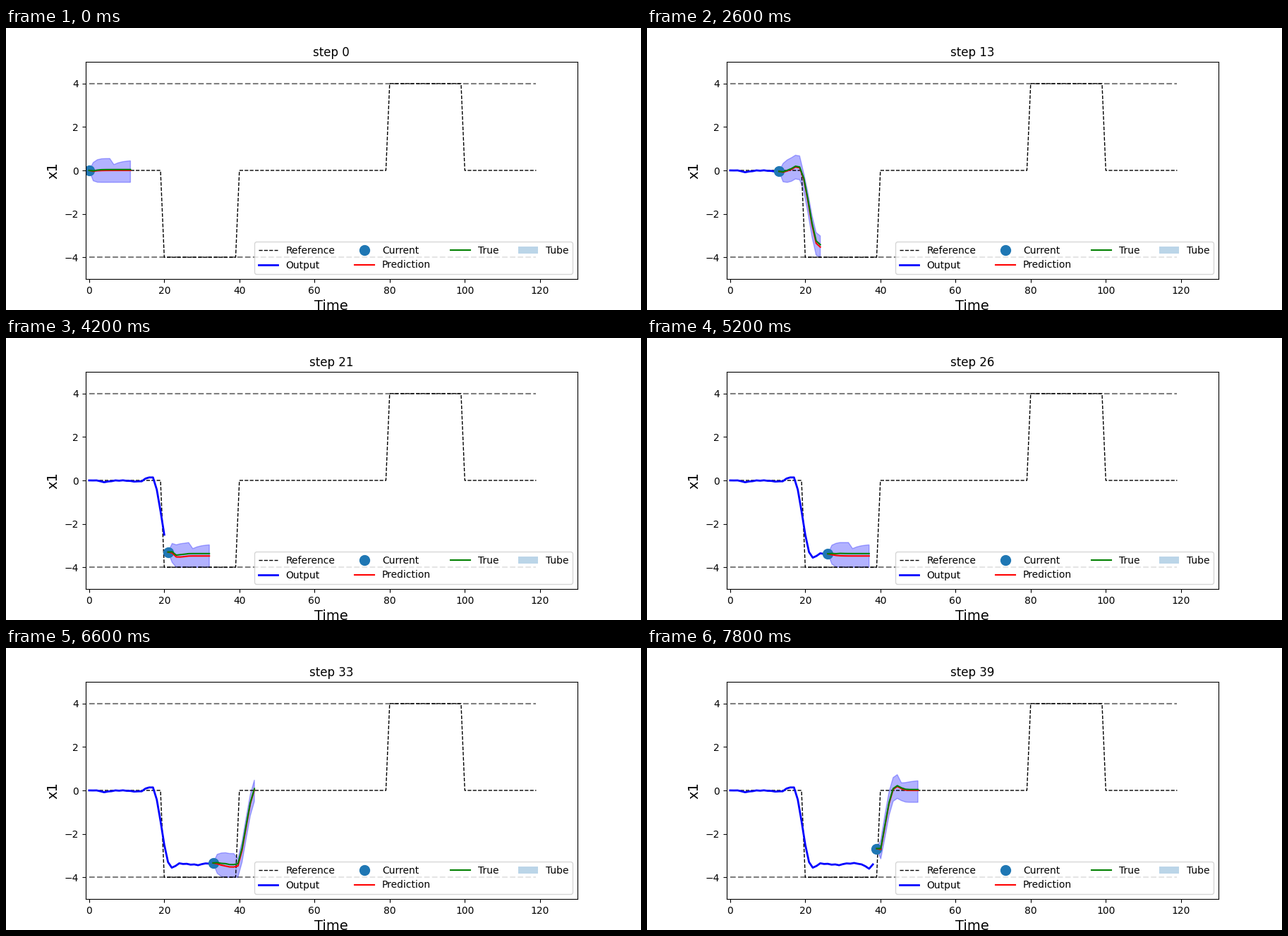
Animation, 900 px wide and 400 px high, one loop 8 s. Source, as a matplotlib script:

```python
import numpy as np
import matplotlib.pyplot as plt
from matplotlib.animation import FuncAnimation
from matplotlib.patches import Patch, Polygon

STEPS = 40
HORIZON = 11
LIMIT = 4
FALL, RISE = 19.3, 39.95    # times at the middle of each move
FLOOR = -3.53               # lowest planned value

J = np.arange(HORIZON)
AHEAD = np.maximum(J - 1, 0)    # the first point is held for one step
DECAY = .4 ** AHEAD

# Tube half widths along the horizon; the upper one restarts at J = 6.
UPPER = np.where(J < 6, .51 * (1 - np.exp(-1.4 * J)), .43 - .2 * np.exp((6 - J) / 2))
LOWER = .55 * (1 - np.exp(-1.6 * J))


def surge(u):
    """Step from 0 to 1 that swings past both ends."""
    return .5 + .5 * np.tanh(.66 * u) + .025 * u ** 3 * np.exp(-u ** 2 / 4)


def seen(k, centre):
    """How far a coming move is taken into account at step k."""
    return np.clip((k - centre + 12.3) / 3, 0, 1)


def measure():
    """State at every step: both moves with a slow sway and some noise."""
    t = np.arange(STEPS)
    noise = np.random.default_rng(4).normal(0, .015, STEPS)
    sway = .035 * np.cos(.78 * t) - .025
    return 3.36 * (surge(t - RISE) - surge(t - FALL)) + sway + noise


def predict(k):
    """Prediction, true path and tube bounds at step k."""
    t = k + AHEAD
    move = seen(k, RISE) * surge(t - RISE) - seen(k, FALL) * surge(t - FALL)
    plan = np.maximum(3.48 * move, FLOOR)
    pred = plan + (output[k] - .04 - plan[0]) * DECAY
    true = pred + (.04 - .02 * pred) * np.minimum(1, .5 + .25 * AHEAD)
    high = np.minimum(true + UPPER, LIMIT)
    low = np.maximum(pred - LOWER, -LIMIT)
    for path in (pred, true, high, low):
        path[0] = output[k]
    return pred, true, high, low


output = measure()

fig, ax = plt.subplots(figsize=(9, 4), dpi=100)
ax.set_xlim(-1, 130)
ax.set_ylim(-5, 5)
ax.set_xlabel("Time", fontsize=14)
ax.set_ylabel("x1", fontsize=14)
title = ax.set_title("step 0")

time = np.arange(120)
reference = np.zeros(120)
reference[20:40] = -LIMIT
reference[80:100] = LIMIT

for bound in (LIMIT, -LIMIT):
    ax.plot(time, np.full(120, bound), "k--", alpha=.5)
ref_line, = ax.plot(time, reference, "k--", lw=1, label="Reference")
out_line, = ax.plot([], [], "b", lw=2, label="Output")
dot, = ax.plot([], [], "o", color="C0", ms=10, label="Current")
pred_line, = ax.plot([], [], "r", label="Prediction")
true_line, = ax.plot([], [], "g", label="True")
tube = ax.add_patch(Polygon(np.zeros((3, 2)), color="blue", alpha=.3, lw=1, zorder=1))

tube_key = Patch(facecolor="C0", alpha=.3, lw=0, label="Tube")
ax.legend(handles=[ref_line, out_line, dot, pred_line, true_line, tube_key],
          loc="lower right", ncol=4)


def draw(k):
    x = np.linspace(k, k + HORIZON, HORIZON)
    pred, true, high, low = predict(k)
    title.set_text(f"step {k}")
    out_line.set_data(np.arange(k), output[:k])
    dot.set_data([k], [output[k]])
    pred_line.set_data(x, pred)
    true_line.set_data(x, true)
    tube.set_xy(np.column_stack([np.r_[x, x[::-1]], np.r_[high, low[::-1]]]))
    return title, out_line, dot, pred_line, true_line, tube


anim = FuncAnimation(fig, draw, frames=STEPS, init_func=lambda: draw(0),
                     interval=200, repeat=True, repeat_delay=0, blit=False)
plt.show()
```
